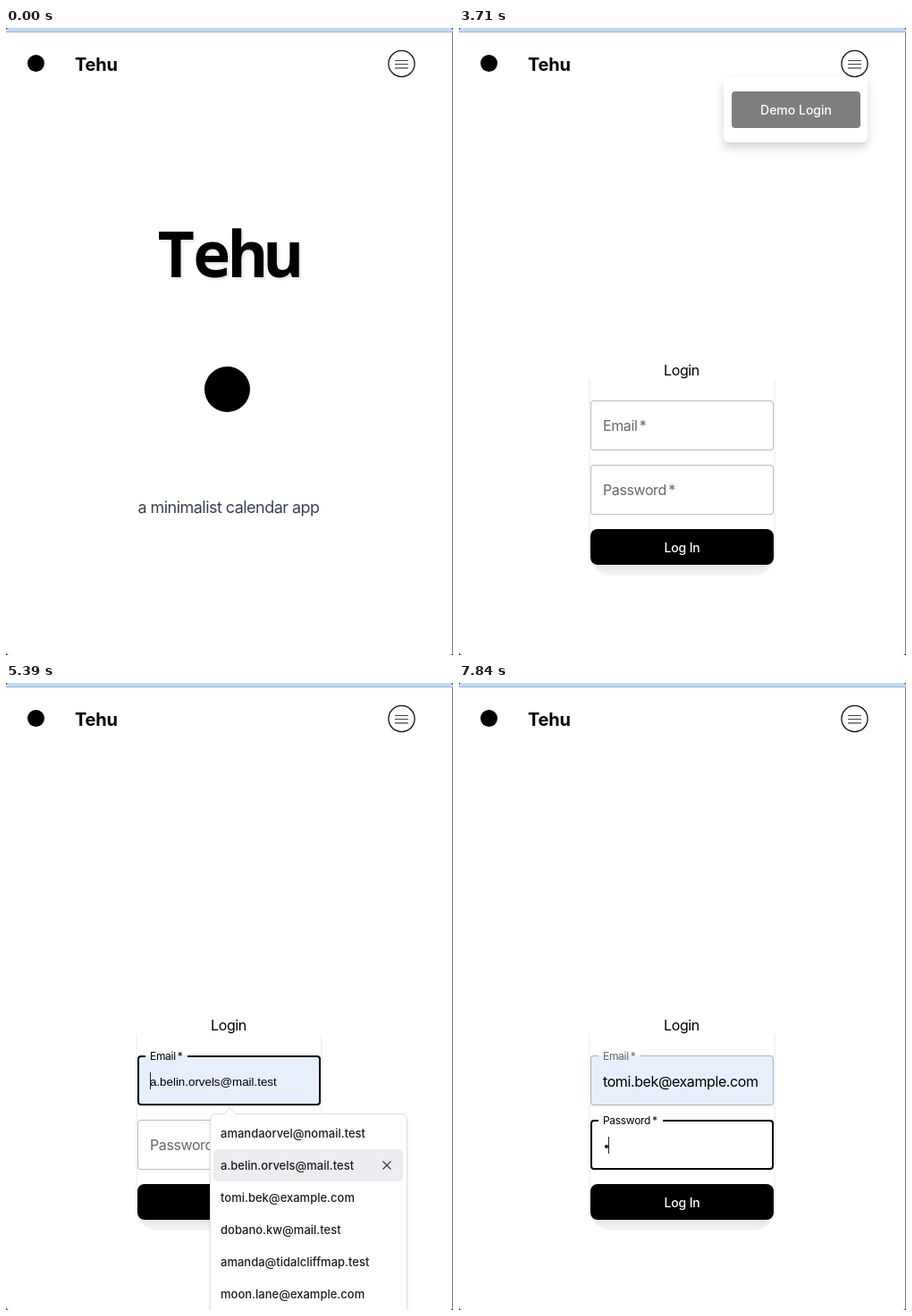
These frames come from a looping animation (500 px wide and 702 px high, 8000 ms). An HTML page:

```html
<!DOCTYPE html>
<html lang="en">
<head>
<meta charset="utf-8">
<title>Calendar app login</title>
<style>
html, body { margin: 0; width: 100%; height: 100%; overflow: hidden; background: #333; }
body, #page { position: relative; }
#page { width: 500px; height: 702px; background: #fff; border-radius: 4px; overflow: hidden;
  font: 16px/20px Inter, sans-serif; letter-spacing: -.025em; color: #000; }
#page div, #page svg { position: absolute; box-sizing: border-box; white-space: nowrap; }
.mid { left: 0; width: 498px; text-align: center; }
.dot { background: #000; border-radius: 50%; }
#bar { width: 500px; height: 5px; background: #c3d7f7; border-bottom: 1px solid #a3b5d3; }
#edge { left: 499px; top: 5px; width: 1px; height: 697px; background: #777; }
#brand { left: 77px; top: 31px; font-size: 20px; font-weight: 700; letter-spacing: -.01em; }
#title { top: 207px; line-height: 90px; font-family: "Noto Sans Mono", monospace; font-size: 71px;
  font-weight: 700; letter-spacing: -2.6px; text-shadow: 2px 2px 3px rgba(0,0,0,.12); }
#tag { top: 527px; font-size: 18px; letter-spacing: -.03em; color: #374151; }
#menu { left: 296px; top: 55px; width: 161px; height: 73px; border-radius: 6px; background: #fff;
  transform-origin: 100% 0; box-shadow: 0 5px 5px -3px rgba(0,0,0,.2),
  0 8px 10px 1px rgba(0,0,0,.14), 0 3px 14px 2px rgba(0,0,0,.12); }
.btn { background: #000; color: #fff; text-align: center; font-size: 14px; font-weight: 500; letter-spacing: 0; }
#menu .btn { left: 9px; top: 16px; width: 144px; height: 41px; line-height: 41px; border-radius: 4px; }
#form .btn { left: 147px; top: 561px; width: 205px; height: 40px; line-height: 41px;
  border-radius: 8px; letter-spacing: -.01em; }
#card { left: 145px; top: 393px; width: 209px; height: 220px; background: #f4f4f4; border-radius: 0 0 26px 26px; }
#shade { left: 150px; top: 580px; width: 199px; height: 26px; background: #e4e4e4;
  border-radius: 0 0 12px 12px; filter: blur(2px); }
#sheet { left: 147px; top: 393px; width: 205px; height: 208px; background: #fff; border-radius: 0 0 8px 8px; }
.field { left: 147px; width: 205px; height: 56px; }
.frame { inset: 0; border: 1px solid; border-radius: 4px; }
.notch { left: 9px; top: 0; height: 2px; }
.label { left: 14px; top: 18px; transform-origin: 0 50%; }
.value { left: 14px; top: 19px; }
.value.preview { font: 13.333px/20px "Liberation Sans", Arial, sans-serif; letter-spacing: 0; top: 20px; }
.caret { left: 14px; top: 19px; width: 1px; height: 19px; background: #222; }
#bullet { left: 16px; top: 28px; width: 4px; height: 4px; }
#list { left: 228px; top: 482px; width: 221px; height: 240px; background: #fff; border: 1px solid #e0e0e0;
  border-radius: 7px; box-shadow: 0 1px 4px rgba(0,0,0,.08); font-size: 13px; font-weight: 500;
  letter-spacing: 0; color: #1c1c1c; }
#list::before { content: ""; position: absolute; left: 16px; top: -6px; width: 10px; height: 10px;
  background: #fff; border: solid #e6e6e6; border-width: 1px 0 0 1px; box-sizing: border-box; transform: rotate(45deg); }
.row { left: 3px; width: 212px; height: 36px; line-height: 36px; padding-left: 8px; border-radius: 5px; }
.row svg { left: 188px; top: 12px; }
</style>
</head>
<body>
<div id="page">
  <div id="bar"></div>
  <div id="edge"></div>
  <div class="dot" style="left:24px;top:30px;width:19px;height:19px"></div>
  <div id="brand">Tehu</div>
  <svg width="40" height="40" style="left:422px;top:20px" fill="none">
    <circle id="ripple" cx="20.5" cy="20" fill="#000"/>
    <circle cx="20.5" cy="20" r="14.6" stroke="#111" stroke-width="1.3"/>
    <path d="M13 16.5h15M13 20.5h15M13 24.9h15" stroke="#444" stroke-width="1.1"/>
  </svg>
  <div id="home">
    <div id="title" class="mid">Tehu</div>
    <div class="dot" style="left:222px;top:379px;width:51px;height:51px"></div>
    <div id="tag" class="mid">a minimalist calendar app</div>
  </div>
  <div id="form">
    <div id="card"></div><div id="shade"></div><div id="sheet"></div>
    <div class="mid" style="top:373px">Login</div>
    <div class="btn">Log In</div>
    <div class="field" id="email" style="top:417px">
      <div class="frame"></div><div class="notch"></div><div class="label">Email&thinsp;*</div>
      <div class="value"></div><div class="caret"></div>
    </div>
    <div class="field" id="pass" style="top:489px">
      <div class="frame"></div><div class="notch"></div><div class="label">Password&thinsp;*</div>
      <div class="dot" id="bullet"></div><div class="caret"></div>
    </div>
    <div id="list"></div>
  </div>
  <div id="menu"><div class="btn">Demo Login</div></div>
</div>
<script>
const LOOP = 8000, STEP = 70;
const OPEN = 2690, LEAVE = 3640, CLOSE = 3633, GROW = 220;
const EMAIL = 4940, PASS = 6750, PICK = 6160, TYPED = 7840;
const mails = ["amandaorvel@nomail.test", "a.belin.orvels@mail.test", "tomi.bek@example.com",
  "dobano.kw@mail.test", "amanda@tidalcliffmap.test", "moon.lane@example.com"];
const $ = id => document.getElementById(id);
const clamp = x => Math.min(1, Math.max(0, x));
const within = (t, ...spans) => spans.some(([a, b]) => t >= a && t < b);
const show = (el, on) => el.style.visibility = on ? "inherit" : "hidden";

// y of the cubic bezier with control points (x1, 0) and (.2, 1)
function ease(x, x1) {
  let lo = 0, hi = 1;
  for (let i = 0; i < 24; i++) {
    const s = (lo + hi) / 2, r = 1 - s;
    if (3 * s * r * r * x1 + 3 * s * s * r * .2 + s * s * s < x) lo = s; else hi = s;
  }
  return lo * lo * (3 - 2 * lo);
}
const inOut = (t, start, dur) => ease(clamp((t - start) / dur), .4);
const out = (t, start) => ease(clamp((t - start) / 200), 0);

const rows = mails.map((mail, i) => {
  const row = document.createElement("div");
  row.className = "row";
  row.style.top = 3 + 36 * i + "px";
  row.innerHTML = mail + '<svg width="12" height="12"><path d="M1.5 1.5l9 9M10.5 1.5l-9 9" stroke="#444" stroke-width="1.4"/></svg>';
  $("list").append(row);
  return row;
});

function drawField(el, { lift, tint, focus, hover, filled, notch, caret }) {
  const part = name => el.querySelector("." + name).style;
  const fill = filled ? "#e7effd" : "#fff";
  part("frame").background = fill;
  part("frame").borderWidth = focus ? "2px" : "1px";
  part("frame").borderColor = focus ? "#000" : hover ? "rgba(0,0,0,.87)" : "rgba(0,0,0,.26)";
  part("notch").background = fill;
  part("notch").width = notch + "px";
  part("label").transform = `translateY(${-28 * lift}px) scale(${1 - .25 * lift})`;
  const grey = 102 * (1 - tint);
  part("label").color = `rgb(${grey},${grey},${grey})`;
  show(el.querySelector(".caret"), caret);
}

function drawMenu(t) {
  const closing = t >= CLOSE;
  const alpha = closing ? 1 - inOut(t, CLOSE, GROW) : inOut(t, OPEN, GROW);
  const size = closing ? 1 - inOut(t, CLOSE + GROW / 3, GROW) : inOut(t, OPEN, GROW * 2 / 3);
  $("menu").style.opacity = alpha;
  $("menu").style.transform = `scale(${.75 + .25 * size}, ${.5625 + .4375 * size})`;
  $("ripple").setAttribute("r", 4 + 8 * clamp((t - 2730) / 140));
  $("ripple").setAttribute("opacity", t < 2730 ? 0 : .16 * (1 - clamp((t - 2870) / 140)));
}

function drawForm(t) {
  const hot = t < 5320 || t >= PICK ? -1 : t >= 5880 ? 2 : Math.min(3, Math.floor((t - 5320) / STEP));
  const picked = t >= PICK;
  drawField($("email"), {
    lift: out(t, EMAIL), tint: out(t, EMAIL) - out(t, PASS),
    focus: within(t, [EMAIL, PASS]), hover: within(t, [4410, 4480], [4760, EMAIL]),
    filled: picked || hot >= 0, notch: 47 * clamp((t - EMAIL - 50) / 100),
    caret: within(t, [EMAIL, 5460], [6020, PICK])
  });
  drawField($("pass"), {
    lift: out(t, PASS), tint: out(t, PASS), focus: t >= PASS,
    hover: within(t, [4550, 4690], [6510, PASS]),
    notch: 72 * clamp((t - PASS - 50) / 100),
    caret: within(t, [PASS, 7280], [TYPED, LOOP])
  });
  const value = $("email").querySelector(".value");
  value.textContent = picked ? mails[2] : mails[hot] || "";
  value.classList.toggle("preview", !picked);
  show($("bullet"), t >= TYPED);
  $("pass").querySelector(".caret").style.left = t >= TYPED ? "20px" : "14px";
  show($("list"), within(t, [EMAIL, PICK]));
  rows.forEach((row, i) => {
    row.style.background = i === hot ? "#edecf0" : "";
    show(row.lastChild, i === hot && within(t, [LEAVE, LOOP]));
  });
}

function draw(now) {
  const t = Math.floor(now % LOOP / STEP) * STEP;
  show($("home"), t < LEAVE);
  show($("form"), t >= LEAVE);
  drawMenu(t);
  drawForm(t);
  requestAnimationFrame(draw);
}
draw(0);
</script>
</body>
</html>
```
